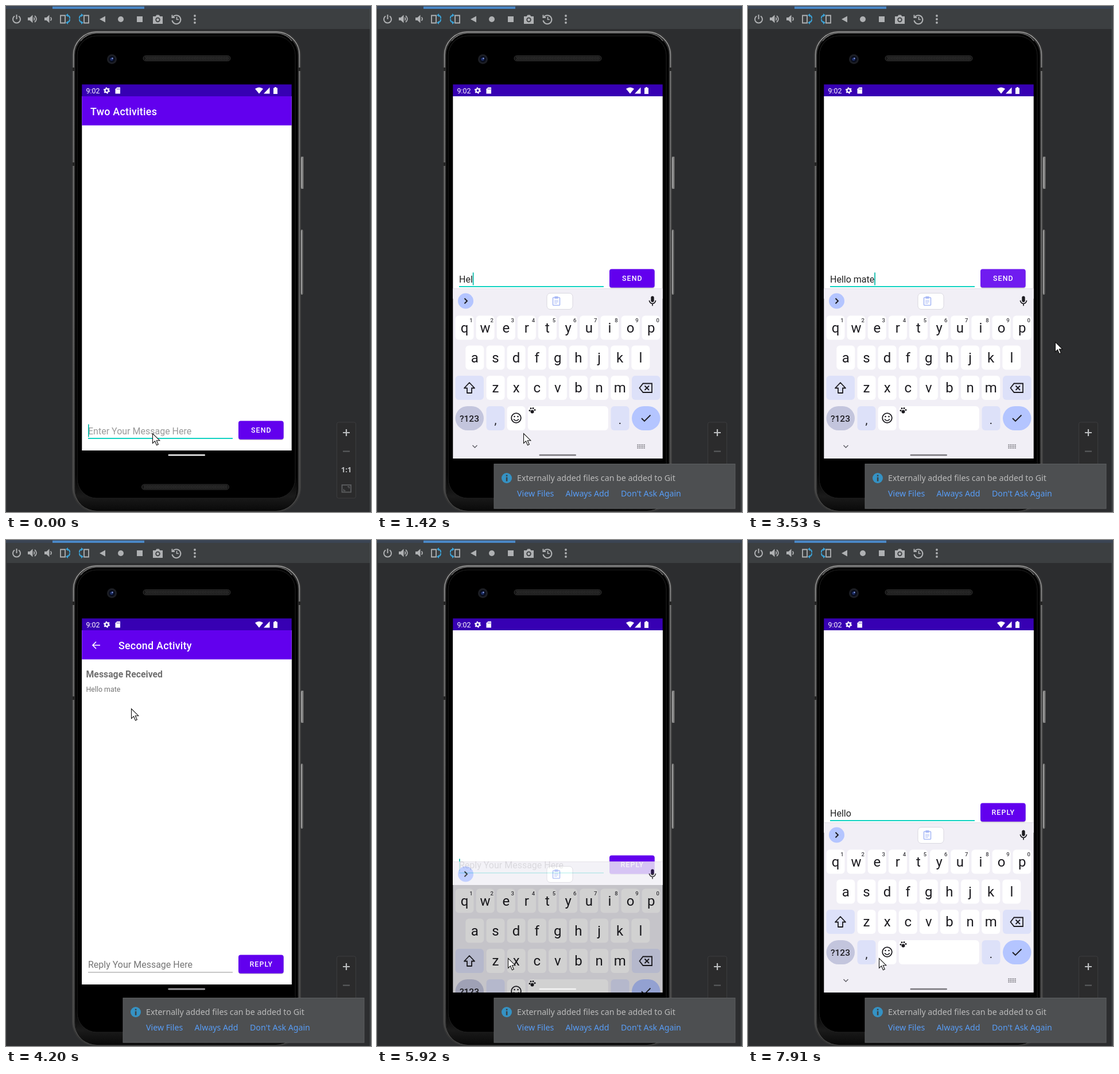
An HTML page for the animation above (8000 ms loop, 636 by 880 pixels).

```html
<!DOCTYPE html>
<html lang="en">
<head>
<meta charset="utf-8">
<style>
html, body { margin: 0; width: 100%; height: 100%; overflow: hidden; background: #2c2d2f; }
svg { display: block; width: 636px; height: 880px; font-family: Roboto, sans-serif; }
.ui { font-family: "Noto Sans", "Open Sans", sans-serif; }
</style>
</head>
<body>
<svg id="stage" viewBox="0 0 636 880"></svg>
<script>
const rect = (x, y, w, h, fill, r = 0, more = '') =>
  `<rect x="${x}" y="${y}" width="${w}" height="${h}" rx="${r}" fill="${fill}" ${more}/>`;
const line = (d, color, w = 2, more = '') =>
  `<path d="${d}" fill="none" stroke="${color}" stroke-width="${w}" ${more}/>`;
const shape = (d, fill, more = '') => `<path d="${d}" fill="${fill}" ${more}/>`;
const dot = (x, y, r, fill, more = '') => `<circle cx="${x}" cy="${y}" r="${r}" fill="${fill}" ${more}/>`;
const text = (x, y, s, size, fill, more = '') =>
  `<text x="${x}" y="${y}" font-size="${size}" fill="${fill}" ${more}>${s}</text>`;
const group = (id, body, more = '') => `<g id="${id}" ${more}>${body}</g>`;
const gradient = (id, vertical, colors) =>
  `<linearGradient id="${id}" x2="${vertical ? 0 : 1}" y2="${vertical ? 1 : 0}">` +
  colors.map(([at, c]) => `<stop offset="${at}" stop-color="${c}"/>`).join('') + '</linearGradient>';
const mid = 'text-anchor="middle"', medium = 'font-weight="500"';
const round = 'stroke-linecap="round" stroke-linejoin="round"';

function toolbar() {
  const c = '#afb1b3', blue = '#3ba3d8';
  const speaker = x => shape(`M${x} 20h3.5l5-4.500v14l-5-4.500h-3.500z`, c);
  return rect(0, 0, 636, 5, '#3b4554') + rect(81, 1, 160, 4, '#4a88c7') +
    rect(0, 5, 634, 35, '#3c3f41') + rect(634, 5, 1.2, 875, '#505458') + rect(0, 5, 1.5, 875, '#333537') +
    line('M15 17.5a6.5 6.5 0 1 0 7 0M18.5 15v8', c, 2) +
    speaker(38) + line('M48.5 20q2 2.500 0 5M50 17q6 5.500 0 11', c, 1.7) +
    speaker(67) + line('M77.5 19.500q3 3 0 6', c, 1.7) +
    line('M95 16.5h8v13h-8z', c, 1.8) + line('M106 16q6 1 5 6M106 29q5-1 5-6', blue, 2) +
    shape('M104 16l4-3v6zM104 29l4-3v6z', blue) +
    line('M136 16.5h8v13h-8z', c, 1.8) + line('M133 16q-6 1-5 6M133 29q-5-1-5-6', blue, 2) +
    shape('M135 16l-4-3v6zM135 29l-4-3v6z', blue) +
    shape('M163 23l10-5.5v11z', c) + dot(200, 23, 5, c) + rect(228, 18, 10, 10, c) +
    shape('M256 18h4.5l2-2.5h4l2 2.5h4.5v13h-17z', c) + dot(264.5, 24, 4.2, '#3c3f41') + dot(264.5, 24, 2.4, c) +
    line('M291 19a7.5 7.5 0 1 1-1.5 6M289.5 15.5v4.5h4.5', c, 2) + line('M297.5 19v4.5h3.5', c, 1.7) +
    [17, 23, 29].map(y => dot(329, y, 1.9, c)).join('');
}

function phone() {
  const speaker = (x, y) => rect(x, y, 152, 9, '#161616', 4.5, 'stroke="#333"') +
    [2.5, 4.5, 6.5].map((d, i) => line(`M${x + 4 + i % 2} ${y + d}h144`, '#555', 1.1, 'stroke-dasharray="1.3 1.5"')).join('');
  const button = (y, h, w) => rect(513, y, w, h, '#858585', 2) +
    rect(512 + w, y + 1, 1, h - 2, '#484848') + rect(513.5, y + 2, 1.3, h - 4, '#c0c0c0');
  const seam = (x, y) => rect(x, y, 5, 6, '#242424');
  return button(262, 56, 6) + button(389, 113, 4.5) +
    rect(115.5, 43, 398, 837, 'url(#metal)', 42, 'stroke="#3c3c3c"') +
    rect(117.7, 45, 393.6, 833, 'none', 40, 'stroke="url(#shine)" stroke-width="1.4"') +
    rect(120.5, 48, 388, 830, '#000', 38) +
    line('M130 61q10-13 27-14h314q18 1 27 14', '#7d7d7d', 1.2) +
    shape('M121 815h386v28q-3 33-37 34H158q-34-1-37-34z', 'url(#chin)') +
    rect(124, 52, 380, 804, '#000', 34, 'stroke="#202020"') +
    seam(115.5, 107) + seam(115.5, 272) + seam(508.5, 107) +
    dot(184.5, 92.5, 8.5, '#1c1e24') + dot(184.5, 92.5, 5.4, '#080c1c') + dot(184, 92.5, 2.8, '#1d2d63') + dot(185.5, 91, 1.2, '#8fa6e8') +
    speaker(239, 86.5) + speaker(236.5, 832);
}

function statusBar() {
  const w = '#fff';
  return rect(132.3, 136.4, 365.4, 21.1, '#3700b3') +
    text(139.5, 152, '9:02', 12.4, w) +
    dot(175.5, 147, 3.1, 'none', 'stroke="#fff" stroke-width="2.4"') +
    dot(175.5, 147, 4.8, 'none', 'stroke="#fff" stroke-width="1.6" stroke-dasharray="2.5 2.53"') +
    shape('M193.5 141.5h5.5v11h-8.5v-8z', w) + line('M193.5 143.5v2M195.5 143.5v2M197.5 143.5v2', '#3700b3', .8) +
    shape('M434 144q7-5 14 0l-7 8.5z', w) + shape('M449 152.5h10.5v-11z', w) +
    shape('M466 142.5h2v-1.5h3v1.5h2v10.5h-7z', w);
}

const title = (x, s) => rect(132, 157, 366, 50.6, '#6200ee') +
  text(x, 189.5, s, 17.9, '#fff', medium + ' letter-spacing=".22"');

function app() {
  return rect(132, 157, 366, 616, '#fff') +
    group('first', title(147, 'Two Activities')) +
    group('second', rect(132, 157, 366, 616, '#fff') + title(196, 'Second Activity') +
      line('M164 183h-13M157 177l-6 6 6 6', '#fff', 1.6) +
      text(139.5, 239, 'Message Received', 15.8, '#6f6f6f', 'font-weight="700"') +
      text(139.5, 264, 'Hello mate', 12.4, '#757575')) +
    text(143, 744.5, '', 16, '#999', 'id="field"') +
    rect(143, 751, 252, 2, '#03dac5', 0, 'id="underline"') +
    rect(143, 727.5, 1.7, 22, '#03b8a8', 0, 'id="caret"') +
    rect(405, 723, 79, 32, '#000', 4, 'opacity=".18"') +
    rect(405, 721.5, 78.7, 32.2, '#6200ee', 4, 'id="button"') +
    text(444.9, 742.3, '', 12.4, '#fff', `id="label" ${mid} ${medium} letter-spacing="1.1"`);
}

function keyboard() {
  const ink = '#1c1b20', soft = '#dde1f9', accent = '#b4c5ff', pitch = 36.13;
  const key = (x, y, w, fill = '#fff', r = 6) => rect(x, y, w, 42, fill, r);
  const row = (letters, x, y) => [...letters].map((c, i) =>
    key(x + i * pitch, y, 32) + text(x + 16 + i * pitch, y + 29, c, 24, ink, mid)).join('');
  const hints = [...'1234567890'].map((c, i) =>
    text(164 + i * pitch, 550, c, 9.5, '#3c3b41', mid + ' ' + medium)).join('');
  const paw = dot(270.5, 705.5, 3, ink) + dot(266, 703.5, 1.5, ink) + dot(268, 699.8, 1.5, ink) +
    dot(272, 699.5, 1.5, ink) + dot(275, 702.6, 1.5, ink);
  const emoji = dot(242.5, 716.5, 8.3, 'none', `stroke="${ink}" stroke-width="1.8"`) +
    dot(239.5, 714, 1.3, ink) + dot(245.5, 714, 1.3, ink) + line('M238 718.5q4.500 5.500 9 0', ink, 1.7);
  const chip = rect(296, 499.5, 45, 28, '#fff', 6, 'stroke="#d9d8e0"') +
    rect(306.5, 507, 12, 13.5, 'none', 1, 'stroke="#a9baf6" stroke-width="1.6"') +
    rect(309.5, 505, 6, 4, '#a9baf6') + line('M309 512h7M309 514.500h7M309 517h5', '#a9baf6', 1.1);
  let dots = '';
  for (let i = 0; i < 15; i++) dots += rect(453.5 + i % 5 * 2.9, 762.5 + (i / 5 | 0) * 2.7, 1.6, 1.6, '#626168');
  return rect(132, 492, 366, 295, '#f1eff6') + rect(132, 491, 366, 1.2, '#e3e1e8') +
    dot(154.5, 513, 13.5, accent) + line('M152.500 508.500l4.500 4.500-4.500 4.500', ink, 1.9) +
    rect(477.3, 504.5, 5.4, 10.5, ink, 2.7) + line('M474.500 512a5.500 5.500 0 0 0 11 0M480 517.500v4', ink, 1.7) +
    group('chip', chip) +
    row('qwertyuiop', 136.5, 538.5) + hints + row('asdfghjkl', 154.3, 590.5) + row('zxcvbnm', 190.5, 643) +
    key(136.5, 643, 49.5, soft) + key(444, 643, 49.5, soft) +
    line('M161 655l-9 9.500h5v8.500h8v-8.500h5z', ink, 1.8, round) +
    line('M463.500 656.500h15.500v15.500h-15.500l-6-7.750zM466.500 660.500l7.500 7.500M474 660.500l-7.500 7.500', ink, 1.8) +
    key(136.5, 696, 49.5, '#c3c5dd', 21) + text(161, 722.5, '?123', 15.5, ink, mid + ' ' + medium) +
    key(190.5, 696, 32, soft) + text(206.5, 727, ',', 20, ink, mid) +
    key(226.6, 696, 32) + emoji + key(262.8, 696, 140) + paw +
    key(407.5, 696, 32, soft) + text(423.5, 727, '.', 20, ink, mid) +
    key(444, 696, 49.5, accent, 21) + line('M461 717l5 5 10.500-10.500', ink, 1.8) +
    group('nav', line('M166.500 764l4 4 4-4', '#626168', 1.5) + dots);
}

function zoomPanel() {
  const c = '#bcbec0', dim = '#5c5e60';
  return rect(576.5, 724, 33, 132, '#2b2b2c', 3, 'stroke="#3c3d3f"') +
    line('M587 742h12M593 736v12', c, 2.2) + line('M587 774.500h12', dim, 2) +
    text(593, 810.5, '1:1', 13, c, `class="ui" ${mid} font-weight="800"`) +
    rect(585.5, 833, 15.5, 12.5, 'none', 0, `stroke="${dim}" stroke-width="1.8"`) +
    line('M588.500 840v3h3M595 836h3v3', dim, 1.3);
}

function notice() {
  const ui = 'class="ui"', link = '#589df6', size = 14.2;
  return rect(204, 796.5, 420, 77.5, '#4d4f51', 0, 'stroke="#5c5e60"') +
    dot(226, 821, 9, '#3592c4') + rect(224.8, 815.5, 2.6, 2.4, '#3d4245') + rect(224.8, 819.5, 2.6, 7, '#3d4245') +
    text(244, 826, 'Externally added files can be added to Git', size, '#bbb', ui) +
    text(244, 853, 'View Files', size, link, ui) + text(328.5, 853, 'Always Add', size, link, ui) +
    text(425, 853, "Don't Ask Again", size, link, ui);
}

const $ = id => document.getElementById(id);
$('stage').innerHTML = '<defs>' +
  gradient('metal', false, [[0, '#4c4c4c'], [.012, '#2c2c2c'], [.988, '#2c2c2c'], [1, '#4c4c4c']]) +
  gradient('shine', true, [[0, '#a8a8a8'], [.1, '#808080'], [.6, '#6c6c6c'], [1, '#484848']]) +
  gradient('chin', true, [[0, '#000'], [.6, '#1b1b1b'], [1, '#0a0a0a']]) +
  `<clipPath id="window">${rect(132.3, 157, 365.4, 616)}</clipPath>
  <clipPath id="screen">${rect(132.3, 157, 365.4, 630)}</clipPath></defs>` +
  rect(0, 0, 636, 880, '#2c2d2f') + toolbar() + phone() + statusBar() +
  `<g clip-path="url(#window)">${group('app', app())}</g>` +
  `<g clip-path="url(#screen)">${group('keys', keyboard())}</g>` +
  rect(282.5, 779.7, 64.5, 2.6, '#f4f4f4', 1.3) + rect(282.5, 779.7, 64.5, 2.6, '#77757b', 1.3, 'id="handle"') +
  zoomPanel() + group('notice', notice()) +
  group('pointer', shape('M.5.5v17l4-3.800 3 7 2.800-1.200-3-6.800h5.500z', '#fff', 'stroke="#111" stroke-width="1.1"'));

// Each track holds its value from the given time on.
const tracks = {
  // content shift, keyboard drop, keyboard opacity
  slide: [[0, 0, 0, 0], [570, 95, 110, .55], [690, 212, 20, 1], [810, 264, 0, 1], [3950, 0, 0, 0],
    [5770, 60, 140, .45], [5920, 173, 68, .82], [6070, 245, 15, 1], [6220, 264, 0, 1]],
  pointer: [[0, 255, 743], [2410, 345, 600], [2530, 430, 437], [2680, 453, 450], [2830, 444, 466],
    [3410, 470, 500], [3530, 535, 584], [3680, 600, 720], [3810, 622, 815], [3950, 600, 740], [4080, 559, 600],
    [4200, 218, 293], [4320, 203, 262], [4450, 194, 247], [4580, 205, 253], [4700, 215, 310],
    [4830, 225, 470], [4970, 231, 640], [5100, 228, 727]],
  nav: [[0, 0], [930, .5], [1060, 1], [3950, 0], [6340, .5], [6490, 1]],
  handle: [[0, 0], [930, .5], [1060, 1], [4200, .7], [4320, .3], [4450, 0], [6340, .5], [6490, 1]],
  typed: [[0, 0], [1060, 1], [1180, 2], [1420, 3], [1780, 4], [1900, 5], [2290, 7], [2410, 8], [2530, 9], [2680, 10],
    [3950, 0], [6770, 1], [6900, 2], [7030, 3], [7160, 4], [7290, 5]],
  caret: [[0, 1], [2680, 0], [3100, 1], [3950, 0], [5250, 1], [7910, 0]],
  second: [[0, 0], [3950, .6], [4080, 1]]
};
const at = (name, t) => tracks[name].findLast(k => k[0] <= t).slice(1);
const set = (id, values) => { for (const k in values) $(id).setAttribute(k, values[k]); };

function draw(now) {
  const t = now % 8000, reply = t >= 3950, focused = !reply || t >= 5250;
  const [shift, drop, alpha] = at('slide', t), [count] = at('typed', t);
  set('app', { transform: `translate(0 ${-shift})` });
  set('keys', { transform: `translate(0 ${drop})`, opacity: alpha });
  set('chip', { opacity: +(t >= 1060) });
  for (const id of ['nav', 'handle', 'second']) set(id, { opacity: at(id, t)[0] });
  $('field').textContent = count ? 'Hello mate'.slice(0, count) : (reply ? 'Reply' : 'Enter') + ' Your Message Here';
  set('field', { fill: count ? '#212121' : reply ? '#757575' : '#999', y: reply && !count ? 743.5 : 744.5 });
  set('caret', { opacity: at('caret', t)[0], x: 143 + (count ? $('field').getComputedTextLength() : 0) });
  set('underline', { fill: focused ? '#14d3c3' : '#b5b5b5', height: focused ? 2 : 1.5 });
  $('label').textContent = reply ? 'REPLY' : 'SEND';
  set('button', { fill: t >= 3410 && !reply ? '#701cf0' : '#6200ee' });
  set('notice', { opacity: +(t >= 250) });
  set('pointer', { transform: `translate(${at('pointer', t)})` });
}

const start = performance.now();
(function tick() {
  draw(performance.now() - start);
  requestAnimationFrame(tick);
})();
</script>
</body>
</html>
```
